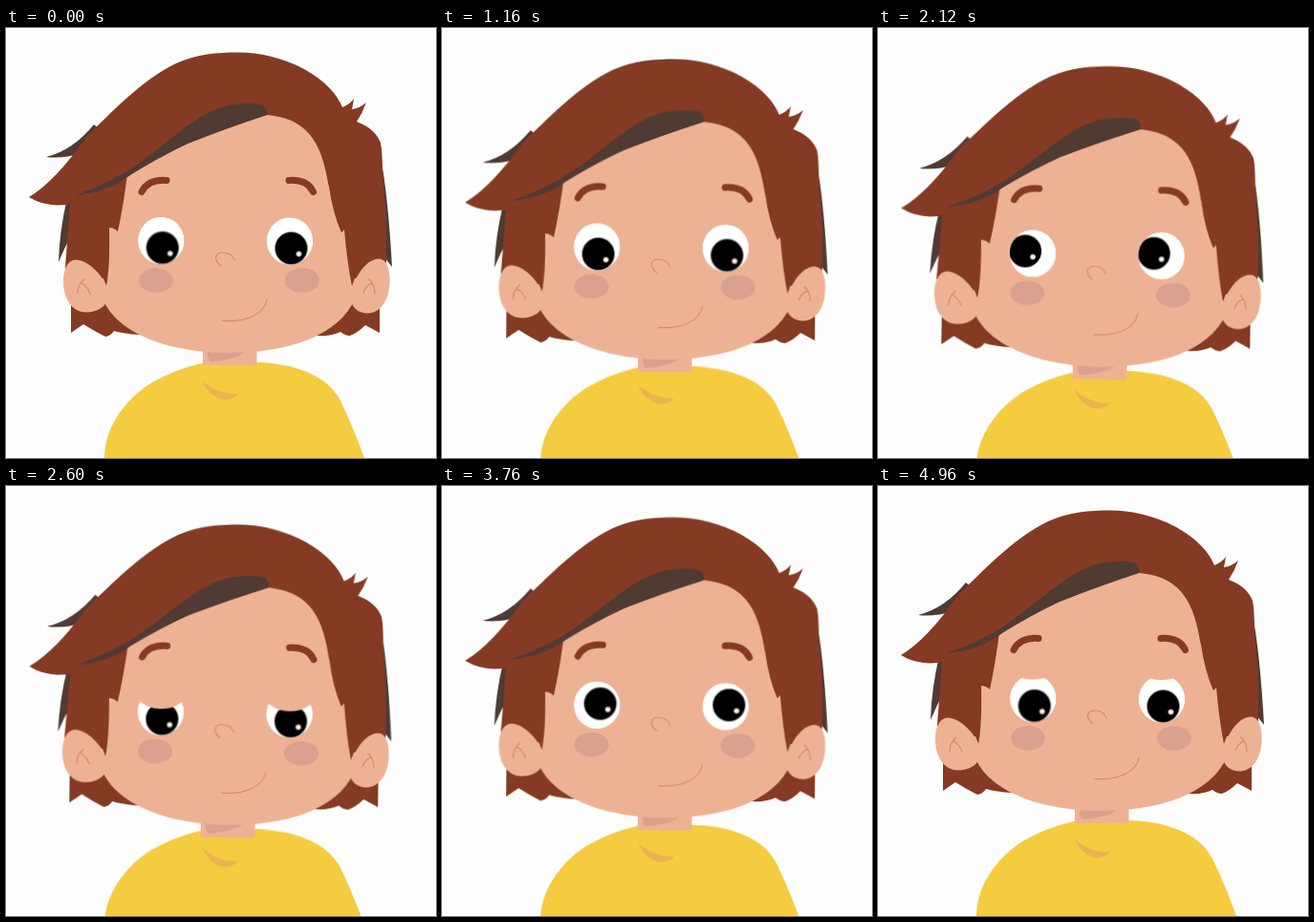
Animation of 450 by 450 pixels, one loop 5 s. Source, as an HTML page:

```html
<!DOCTYPE html>
<html lang="en">
<head>
<meta charset="utf-8">
<title>Boy looking around</title>
<style>
  html, body { margin: 0; width: 100%; height: 100%; overflow: hidden; background: #fdfdfd; }
  svg { display: block; width: 100%; height: 100%; }

  .hair { fill: #853a23; }
  .shade { fill: #4f3a34; }
  .skin { fill: #edb294; }
  .blush { fill: #d9a18e; }
  .shirt { fill: #f5cb40; }
  .line { fill: none; stroke: #ce8b74; stroke-width: 1.2; stroke-linecap: round; }
  .brow { fill: none; stroke: #853a23; stroke-width: 7; stroke-linecap: round; }

  .head, .body { animation: 5s cubic-bezier(.45, 0, .55, 1) infinite; }
  .brows, .pupil, .lid { animation: 5s ease-in-out infinite; }
  .head { animation-name: nod; transform-origin: 230px 200px; }
  .body { animation-name: sink; }
  .brows { animation-name: lift; }
  .pupil { animation-name: look; }
  .lid { animation-name: blink; }

  @keyframes nod {
    0%, 100% { transform: none; }
    48%, 50% { transform: translateY(14.8px) rotate(.85deg); }
  }
  @keyframes sink {
    0%, 100% { transform: none; }
    48%, 50% { transform: translateY(9.5px); }
  }
  @keyframes lift {
    0%, 24%, 60%, 100% { transform: none; }
    50%, 54% { transform: translateY(-6px); }
  }
  @keyframes look {
    0%, 23%, 48%, 66%, 88%, 100% { transform: translate(1.5px, 7.5px); }
    29%, 42% { transform: translate(-8px, -2.5px); }
    72%, 82% { transform: translate(3.5px, -1.5px); }
  }
  @keyframes blink {
    0%, 50.6%, 56.8%, 93.6%, 100% { transform: translateY(-50px); }
    53.6%, 96.8% { transform: translateY(1px); }
  }
</style>
</head>
<body>
<svg viewBox="0 0 450 450">
  <defs>
    <clipPath id="rim"><ellipse rx="24.3" ry="24.8"/></clipPath>
    <clipPath id="socket"><circle r="26"/></clipPath>
    <g id="iris">
      <circle r="17"/>
      <circle cx="8" cy="6" r="2.8" fill="#fdf0e8"/>
    </g>
    <path id="cover" class="skin" d="M-30-70H30V0A30 24 0 0 1-30 0Z"/>
  </defs>

  <g class="body">
    <path class="shirt" d="M103 450C103 416 127 387 152 371.500Q175 358 206 350.500L263 350C300 351 335 362 350 390C360 410 368 431 375 450Z"/>
    <path fill="#e6b552" d="M205 369Q214 387 228 389Q238 389 243 383Q222 384 205 369Z"/>
  </g>

  <g class="head">
    <!-- back hair -->
    <path class="shade" d="M64 178Q56 212 55 245Q61 230 70 214V178ZM393 140Q400 180 404 250L396 240Z"/>
    <path class="shade" d="M92 101Q70 128 42 135Q60 137 78 131L100 108Z"/>
    <path class="hair" d="M68 282V319L81 310Q92 317 104 323Q110 322 113 317Q124 320 140 321V285ZM391 282V319L376 311Q368 319 360 322Q355 322 350 318Q340 323 325 322V285Z"/>
    <path class="skin" d="M206 330H262.500V353H206Z"/>
    <path class="blush" d="M211 336H252Q247 346 214 349Q210 345 211 336Z"/>

    <!-- face -->
    <path class="skin" d="M100 130V280C114 322 176 340 232 340C292 340 348 324 366 282V130L310 80H180Z"/>

    <!-- side and front hair -->
    <path class="hair" d="M68 172L62 250V262H102L105 270Q109 250 108 209Q113 209 117 213Q123 185 127 153Z"/>
    <path class="hair" d="M24 177Q52 160 84 114C108 91 142 54 178 37C200 27 222 25.500 243 25.500C264 25.500 290 31 312 43C334 55 347 70 352 83Q361 79 364 74Q363 81 362 85Q370 84 377 78Q373 89 367 98Q386 105 392 120Q394 130 394 152L398 200V262H365L362 270Q357 245 354 211L351 214Q342 194 338 166C332 133 324 95 273 91Q236 103 190 121Q150 140 100 172Q55 196 24 177Z"/>
    <path class="shade" d="M72 175Q109 163 140 141C172 118 206 83 240 80Q257 78 269 80.500Q274 84 273 91Q230 105 190 121Q160 135 130 154Q106 172 72 175Z"/>

    <!-- ears -->
    <path class="skin" d="M105 270C99 256 85 243 73 242.500C63 243 60 255 60 265C60 285 70 297.500 84 297.500C94 297.500 102 293 105 287Z"/>
    <path class="skin" d="M362 272C368 256 378 242 390 241.500C400 242 402 255 401.500 268C400 288 390 298.500 378 298.500C369 298 364 294 362 288Z"/>
    <path class="line" d="M75 278Q75 268 82 263M79 267Q85 270 88 278M386 278Q386 268 380 263M383 267Q376 270 374 277"/>

    <ellipse class="blush" cx="157" cy="264" rx="18" ry="12.800"/>
    <ellipse class="blush" cx="310" cy="264" rx="18" ry="12.800"/>
    <path class="line" d="M225 249C217 243 218 235 227 235Q236 235 239 243M227 306.500C252 308 271 299 273 284"/>

    <g class="brows">
      <path class="brow" d="M142 171.500Q149 158 168 159.500M296 159.500Q315 158 321.500 171.500"/>
    </g>

    <g transform="translate(162.300 222.500)">
      <g clip-path="url(#rim)">
        <ellipse rx="24.3" ry="24.8" fill="#fff"/>
        <use class="pupil" href="#iris"/>
      </g>
      <g clip-path="url(#socket)"><use class="lid" href="#cover"/></g>
    </g>
    <g transform="translate(297 223)">
      <g clip-path="url(#rim)">
        <ellipse rx="24.3" ry="24.8" fill="#fff"/>
        <use class="pupil" href="#iris"/>
      </g>
      <g clip-path="url(#socket)"><use class="lid" href="#cover"/></g>
    </g>
  </g>
</svg>
</body>
</html>
```
